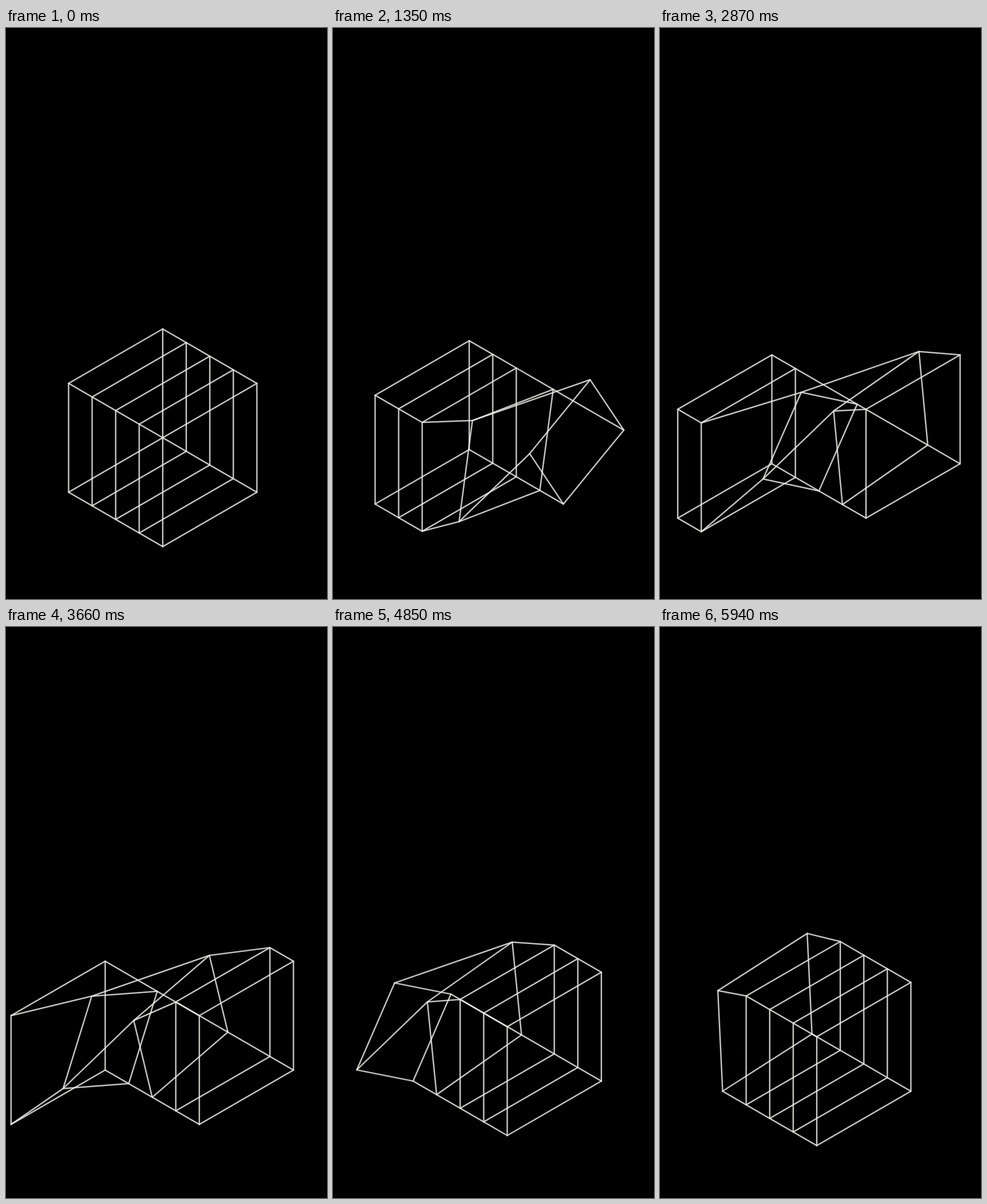
Write an HTML page with a canvas that moves like this. It is 561 px wide and 998 px high and loops after 6050 ms.

```html
<!DOCTYPE html>
<html lang="en">
<head>
<meta charset="utf-8">
<title>Rolling wireframe cube</title>
<style>
  html, body { margin: 0; width: 100%; height: 100%; overflow: hidden; background: #000; }
  canvas { display: block; width: 561px; height: 998px; }
</style>
</head>
<body>
<canvas id="stage"></canvas>
<script>
const W = 561, H = 998;
const LOOP = 6050;
const START = 74;       // the roll begins
const FREEZE = 5940;    // the last pose is held from here
const ROLL = 1989;      // one slice turns by a quarter
const DRIFT = 2.95;     // length of the sideways drift, in rolls
const SLICES = 5;

// Isometric axes: across a slice, up, and from slice to slice
const RIGHT = [164.5, -95.1];
const UP = [0, -190.2];
const STEP = [41.13, 23.78];
const PIVOT = [273.9, 716.2];

const canvas = document.getElementById('stage');
const ctx = canvas.getContext('2d');
const dpr = window.devicePixelRatio || 1;
canvas.width = W * dpr;
canvas.height = H * dpr;

const clamp = x => Math.min(1, Math.max(0, x));
const add = (a, b) => [a[0] + b[0], a[1] + b[1]];
const mul = (a, k) => [a[0] * k, a[1] * k];
const mix = (a, b, k) => add(mul(a, 1 - k), mul(b, k));

// Every corner slides straight to the place of the next one, around a fixed pivot
function slice(i, phase, drift) {
  const p = clamp(phase - (SLICES - 1 - i) / 2);
  const pivot = add(add(PIVOT, mul(STEP, i)), mul(RIGHT, -drift));
  const side = mix(mul(RIGHT, -1), UP, p);
  const rise = mix(UP, RIGHT, p);
  return [pivot, add(pivot, side), add(add(pivot, side), rise), add(pivot, rise)];
}

function trace(points, closed) {
  ctx.beginPath();
  points.forEach(q => ctx.lineTo(q[0], q[1]));
  if (closed) ctx.closePath();
  ctx.stroke();
}

function wires(quads, width, alpha) {
  ctx.lineWidth = width;
  ctx.strokeStyle = `rgba(240, 240, 234, ${alpha})`;
  quads.forEach(q => trace(q, true));
  for (let c = 0; c < 4; c++) trace(quads.map(q => q[c]), false);
}

function draw(t) {
  const phase = Math.max(0, (Math.min(t, FREEZE) - START) / ROLL);
  const drift = clamp(phase / DRIFT);
  const quads = Array.from({ length: SLICES }, (_, i) => slice(i, phase, drift));

  ctx.setTransform(dpr, 0, 0, dpr, 0, 0);
  ctx.fillStyle = '#000';
  ctx.fillRect(0, 0, W, H);
  ctx.lineJoin = ctx.lineCap = 'round';
  wires(quads, 3.2, 0.25);  // soft edge
  wires(quads, 2, 0.82);    // core
}

const t0 = performance.now();
function frame() {
  draw((performance.now() - t0) % LOOP);
  requestAnimationFrame(frame);
}
frame();
</script>
</body>
</html>
```
